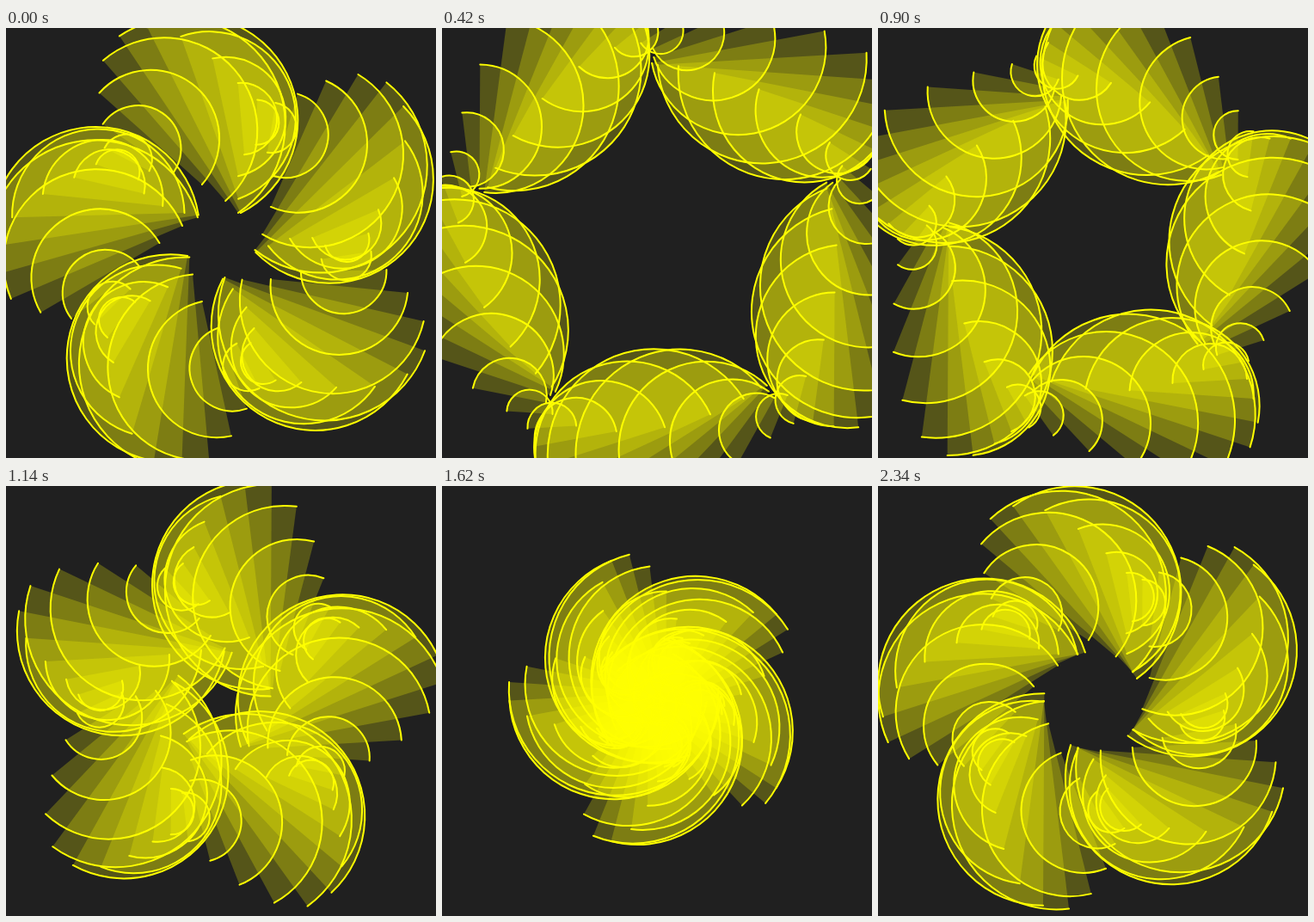
These frames come from a looping animation (500 by 500 pixels, 2.4 s). An HTML page with a canvas:

```html
<!DOCTYPE html>
<html lang="en">
<head>
<meta charset="utf-8">
<title>Turning half discs</title>
<style>
  html, body { margin: 0; width: 100%; height: 100%; overflow: hidden; background: #202020; }
  canvas { display: block; }
</style>
</head>
<body>
<canvas id="stage" width="500" height="500"></canvas>
<script>
  const ctx = document.getElementById('stage').getContext('2d');
  const TAU = Math.PI * 2;
  const COUNT = 50, PETALS = 5;
  const STEP_MS = 60, STEPS = 40;

  function halfDisc(angle, turn) {
    const reach = 125 + 125 * Math.sin(turn);
    const radius = 75 + 50 * Math.sin(PETALS * angle + turn);
    ctx.save();
    ctx.rotate(angle);
    ctx.translate(reach, 50);
    ctx.rotate(turn);
    ctx.beginPath();
    ctx.arc(0, 0, radius, 0, Math.PI);
    ctx.fill();
    ctx.stroke();
    ctx.restore();
  }

  function draw(step) {
    const turn = TAU * step / STEPS + 0.1;
    ctx.setTransform(1, 0, 0, 1, 0, 0);
    ctx.fillStyle = '#202020';
    ctx.fillRect(0, 0, 500, 500);
    ctx.translate(250, 250);
    ctx.fillStyle = 'rgba(255, 255, 0, 0.235)';
    ctx.strokeStyle = '#ff0';
    ctx.lineWidth = 2;
    ctx.lineCap = 'round';
    for (let i = 0; i < COUNT; i++) halfDisc(TAU * i / COUNT, turn);
  }

  const start = performance.now();
  let shown = -1;

  function tick() {
    const step = Math.floor((performance.now() - start) / STEP_MS) % STEPS;
    if (step !== shown) draw(shown = step);
    requestAnimationFrame(tick);
  }
  tick();
</script>
</body>
</html>
```
